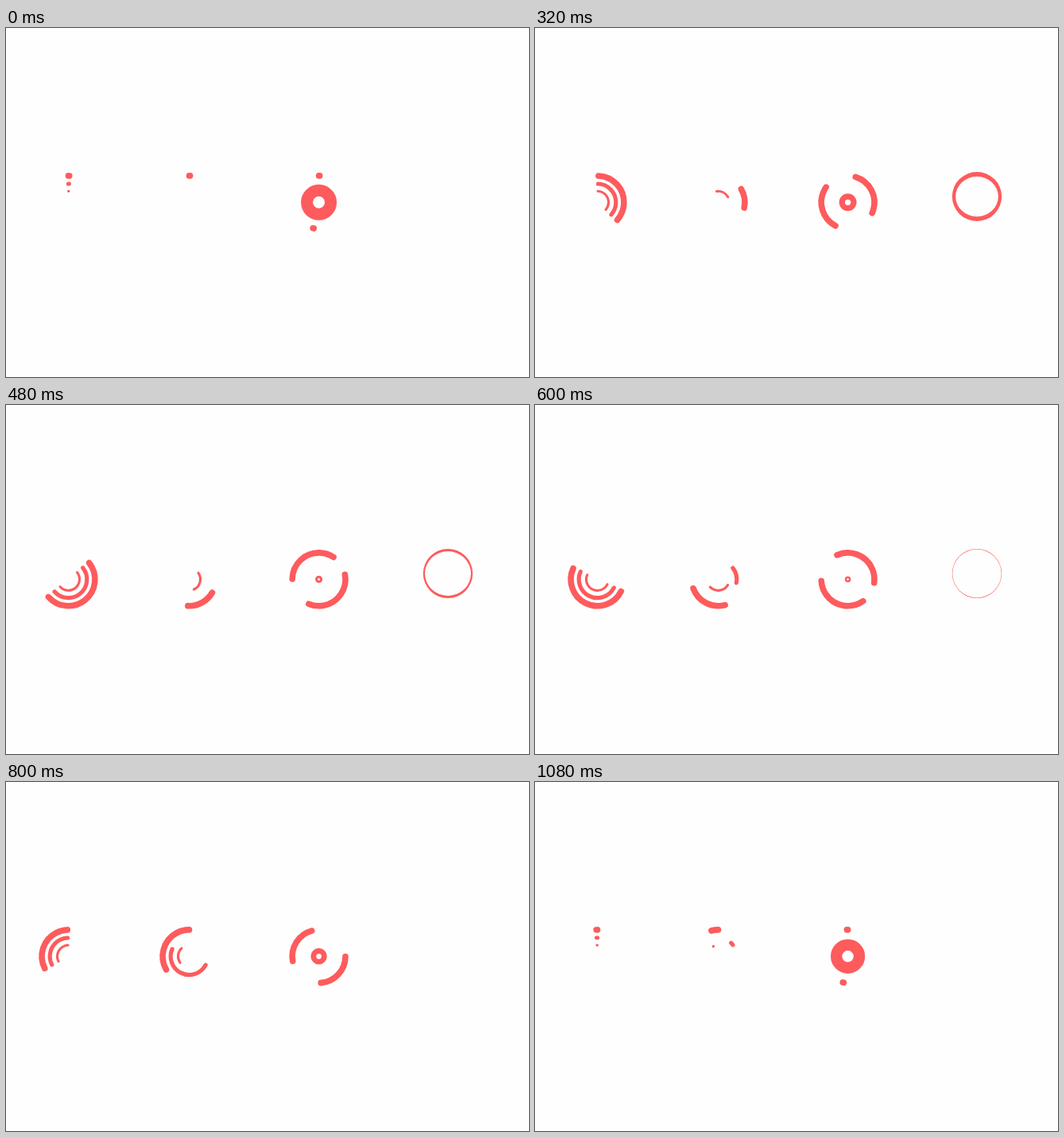
Animation of 658x439 px, one loop 1.12 s. Source, as an HTML page with a canvas:

```html
<!DOCTYPE html>
<html lang="en">
<head>
<meta charset="utf-8">
<title>Loaders</title>
<style>
  html, body { margin: 0; width: 100%; height: 100%; overflow: hidden; background: #fefefe; }
  canvas { display: block; width: 658px; height: 439px; }
</style>
</head>
<body>
<canvas id="stage" width="658" height="439"></canvas>
<script>
const ctx = document.getElementById('stage').getContext('2d');
const RED = '#fe5b5d', PAPER = '#fefefe';
const LOOP = 1120, STEP = 40;
const CY = 219.3;
const OUTER = [33.4, 7.6], MIDDLE = [23.3, 5.2], INNER = [14, 3.1];

const progress = (t, from, to) => Math.min(1, Math.max(0, (t - from) / (to - from)));
const lerp = (a, b, p) => a + (b - a) * p;

// Eased progress between two times
function ease(t, from, to) {
  const p = progress(t, from, to);
  return p * p * (3 - 2 * p);
}

// Soft start, straight finish: cubic-bezier(1/3, 0, 5/6, 5/6)
function easeIn(t, from, to) {
  const x = progress(t, from, to);
  let lo = 0, hi = 1;
  for (let i = 0; i < 24; i++) {
    const s = (lo + hi) / 2;
    if (s + 0.5 * s * s * (1 - s) < x) lo = s; else hi = s;
  }
  return 2.5 * lo * lo - 1.5 * lo * lo * lo;
}

// Part of a ring; start and end are turns clockwise from offset degrees past the top
function arc(cx, [radius, width], start, end, offset = 0) {
  if (end - start < 1e-4) return;
  const base = (offset - 90) * Math.PI / 180;
  ctx.lineWidth = width;
  ctx.beginPath();
  ctx.arc(cx, CY, radius, base + start * 2 * Math.PI, base + end * 2 * Math.PI);
  ctx.stroke();
}

function disc(cx, cy, rx, ry, color) {
  ctx.fillStyle = color;
  ctx.beginPath();
  ctx.ellipse(cx, cy, rx, ry, 0, 0, 2 * Math.PI);
  ctx.fill();
}

function tripleArc(t) {
  const start = ease(t, 280, 1120), end = ease(t, -40, 840);
  for (const ring of [OUTER, MIDDLE, INNER]) arc(78.5, ring, start, end);
}

function chasingArcs(t) {
  const cx = 230.5;
  arc(cx, OUTER, progress(t, 160, 1120), easeIn(t, -40, 800));
  arc(cx, MIDDLE, ease(t, 680, 1120), ease(t, 480, 1000), 52);
  arc(cx, INNER, ease(t, 200, 1120), ease(t, 40, 920), -25);
}

function pulse(t) {
  const cx = 393.6;
  const start = ease(t, 200, 1120), end = ease(t, -40, 920);
  arc(cx, OUTER, start, end);
  arc(cx, OUTER, start, end, 191);
  const shrink = t < 560 ? ease(t, 0, 560) : 1 - ease(t, 560, 1160);
  const r = lerp(22.5, 3.5, shrink) * 2 / 3;
  arc(cx, [r, r], 0, 1);
}

function ripple(t) {
  const red = ease(t, 0, 340), hole = ease(t, 280, 680);
  if (red <= hole) return;
  const grow = (p, color) => disc(556, 212, lerp(26.7, 31.2, p), lerp(25, 31, p), color);
  grow(red, RED);
  grow(hole, PAPER);
}

function draw(time) {
  const t = Math.floor((time % LOOP) / STEP) * STEP;
  ctx.fillStyle = PAPER;
  ctx.fillRect(0, 0, 658, 439);
  ctx.strokeStyle = RED;
  ctx.lineCap = 'round';
  tripleArc(t);
  chasingArcs(t);
  pulse(t);
  ripple(t);
}

const begin = performance.now();
function tick() {
  draw(performance.now() - begin);
  requestAnimationFrame(tick);
}
tick();
</script>
</body>
</html>
```
